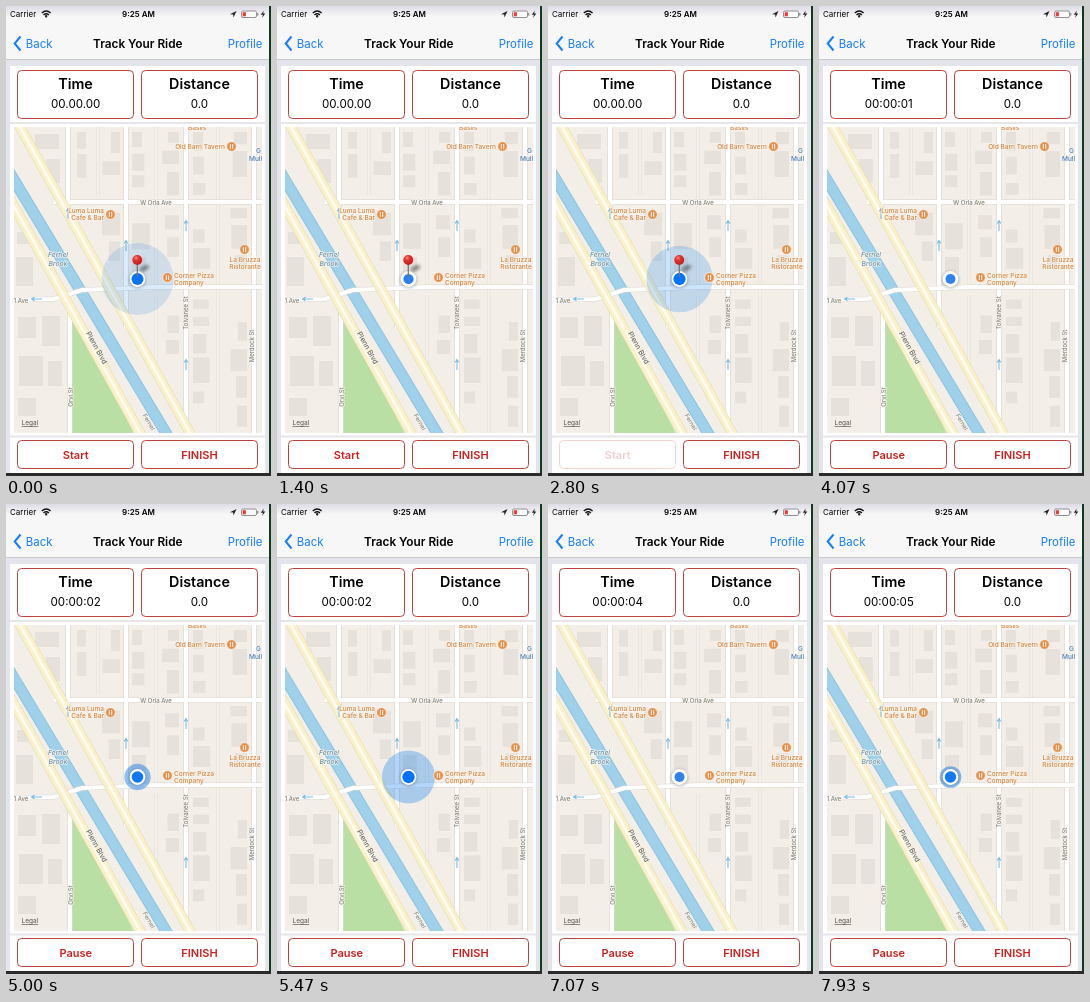
Write an HTML page that moves like this. It is 265 by 470 pixels and loops after 8 s.

```html
<!DOCTYPE html>
<html lang="en">
<head>
<meta charset="utf-8">
<title>Track Your Ride</title>
<style>
  html, body { margin: 0; width: 100%; height: 100%; overflow: hidden; background: #fff; }
  svg { display: block; width: 265px; height: 470px; font-family: Inter, Roboto, sans-serif; }
  .mid { text-anchor: middle; }
  .bold { font-weight: 600; }
  .box { fill: #fff; stroke: #c0423f; }
  .link { fill: #157efb; font-size: 11.4px; }
  .poi { fill: #d7853f; font-size: 6.5px; font-weight: 500; }
  .street { fill: #77736d; font-size: 6px; }
  .water { fill: #55839d; font-size: 6.8px; font-style: italic; }
  .halo-text text { paint-order: stroke; stroke: #f7f4ee; stroke-width: 1.4px; stroke-linejoin: round; }
  .red { fill: #c8211f; font-size: 11px; font-weight: 600; text-anchor: middle; }
</style>
</head>
<body>
<svg viewBox="0 0 265 470">
  <defs>
    <clipPath id="mapClip"><rect x="8" y="121" width="248" height="306"/></clipPath>
    <linearGradient id="barFill" x2="0" y2="1">
      <stop offset="0" stop-color="#dddce6"/><stop offset=".2" stop-color="#f7f7f8"/>
    </linearGradient>
    <radialGradient id="pinFill" cx=".38" cy=".3" r=".75">
      <stop offset="0" stop-color="#ff8a80"/><stop offset=".35" stop-color="#e2322c"/><stop offset="1" stop-color="#bd1d1b"/>
    </radialGradient>
    <filter id="soft" x="-50%" y="-50%" width="200%" height="200%"><feGaussianBlur stdDeviation="1.5"/></filter>
    <path id="arrow" d="M0 5V-5M-1.8-2.5L0-5.5L1.8-2.5" fill="none" stroke="#7dbbe3" stroke-width="1.1"/>
  </defs>

  <!-- Screen and navigation bar -->
  <rect width="265" height="470" fill="#e4e4ec"/>
  <rect width="263" height="53" fill="url(#barFill)"/>
  <path d="M0 53.5H263" stroke="#c9cace"/>
  <rect x="4" y="60" width="255" height="407" fill="#fff"/>
  <path d="M4 117H259M4 430.5H259" stroke="#e6e6e8" stroke-width="2"/>
  <path d="M264 0V470" stroke="#0f3a1e" stroke-width="2"/>
  <path d="M0 468.5H265" stroke="#2b2b2d" stroke-width="3"/>

  <g font-size="8">
    <text x="4" y="11">Carrier</text>
    <text x="132.5" y="11" class="mid bold">9:25 AM</text>
  </g>
  <g fill="none" stroke="#111" stroke-width="1.4">
    <path d="M35.8 7Q40.2 3.2 44.6 7M37.5 9Q40.2 6.7 42.9 9"/>
    <circle cx="40.2" cy="10.3" r=".5"/>
  </g>
  <path d="M224 8.3L230.5 5L227.5 11.5L227.2 8.5Z" fill="#222"/>
  <rect x="235.5" y="5" width="15" height="6.5" rx="1.5" fill="#fff" stroke="#777" stroke-width=".8"/>
  <rect x="236.7" y="6.2" width="3.2" height="4.1" fill="#f03a30"/>
  <path d="M251.8 7V9.6" stroke="#777"/>
  <path d="M257.8 4.5L254.8 8.8H257L256 12L259.3 7.5H257.1Z" fill="#222"/>

  <path d="M14.5 30.5L8.7 37.5L14.5 44.5" fill="none" stroke="#157efb" stroke-width="2"/>
  <text x="19.8" y="42" class="link">Back</text>
  <text x="131.8" y="42" class="mid bold" font-size="11.8">Track Your Ride</text>
  <text x="256.3" y="42" class="link" text-anchor="end">Profile</text>

  <!-- Readouts -->
  <rect x="11.5" y="64.5" width="116" height="48" rx="4" class="box"/>
  <rect x="135.5" y="64.5" width="116" height="48" rx="4" class="box"/>
  <g class="mid">
    <text x="69.5" y="82.5" class="bold" font-size="14.3">Time</text>
    <text x="193.5" y="82.5" class="bold" font-size="14.3">Distance</text>
    <text x="69.7" y="102" font-size="11.6" id="clock">00.00.00</text>
    <text x="193.5" y="102" font-size="11.6">0.0</text>
  </g>

  <!-- Map -->
  <g clip-path="url(#mapClip)">
    <rect x="8" y="121" width="248" height="306" fill="#f3eee8"/>
    <g id="buildings" fill="#e6e1da"/>
    <g id="roads" fill="none"/>
    <circle id="pulse" cx="131.5" cy="273" fill="#0a7aec"/>

    <g class="halo-text">
      <g class="street mid">
        <text x="150" y="198.5">W Orla Ave</text>
        <text x="15" y="297">1 Ave</text>
        <text transform="translate(181.5 307) rotate(-90)">Tolvanee St</text>
        <text transform="translate(247.5 340) rotate(-90)">Merdock St</text>
        <text transform="translate(67 391) rotate(-90)">Orvi St</text>
        <text transform="translate(88.5 343) rotate(61)" style="font-size:7.2px;fill:#55524c">Plenn Blvd</text>
        <text transform="translate(141 417) rotate(60)">Fernel</text>
      </g>
      <g class="water mid">
        <text x="52" y="251">Fernel</text>
        <text x="52" y="259.5">Brook</text>
      </g>
      <g class="poi">
        <text x="182" y="124">Basils</text>
        <text x="219" y="143" text-anchor="end">Old Barn Tavern</text>
        <text x="98" y="207" text-anchor="end">Luma Luma</text>
        <text x="98" y="214" text-anchor="end">Cafe &amp; Bar</text>
        <text x="168" y="271.5">Corner Pizza</text>
        <text x="168" y="278.5">Company</text>
        <text x="239" y="255.5" class="mid">La Bruzza</text>
        <text x="239" y="262.5" class="mid">Ristorante</text>
        <g fill="#4a7fb5"><text x="250" y="147">G</text><text x="243" y="154.5">Mull</text></g>
      </g>
    </g>
    <g id="icons"/>
    <text x="15.5" y="419" font-size="6.5" fill="#55524e" text-decoration="underline">Legal</text>

    <!-- Location dot and pin -->
    <circle cx="131.5" cy="273.5" r="8.6" fill="#555" opacity=".4" filter="url(#soft)"/>
    <circle cx="131.5" cy="273" r="7.9" fill="#fff"/>
    <circle id="dot" cx="131.5" cy="273"/>
    <g id="pin">
      <ellipse cx="138.5" cy="262" rx="5" ry="2.6" transform="rotate(-25 138.5 262)" fill="#333" opacity=".5" filter="url(#soft)"/>
      <path d="M131.3 258V271" stroke="#777" stroke-width="1.3"/>
      <circle cx="131.3" cy="254" r="4.9" fill="url(#pinFill)"/>
    </g>
  </g>

  <!-- Buttons -->
  <g id="startButton">
    <rect x="11.5" y="434.5" width="116" height="28" rx="4" class="box"/>
    <text x="69.7" y="452.5" class="red" id="startLabel">Start</text>
  </g>
  <rect x="135.5" y="434.5" width="116" height="28" rx="4" class="box"/>
  <text x="193.5" y="452.5" class="red">FINISH</text>
</svg>

<script>
const $ = id => document.getElementById(id);
const clamp = x => Math.max(0, Math.min(1, x));

// Building footprints line both sides of each block
let seed = 11;
const random = () => (seed = seed * 16807 % 2147483647) / 2147483647;
const blocks = [[71, 114], [126, 173], [187, 241]];
let footprints = '';
for (const [left, right] of blocks) {
  for (const side of [0, 1]) {
    for (let y = 126; y < 424;) {
      const w = 9 + random() * 9, h = 9 + random() * 17;
      const x = side ? right - w : left;
      const clearOfRoad = x > 14 + (y + h - 121) / 1.8 + 12;
      const clearOfStreets = [196, 283].every(s => y > s + 6 || y + h < s - 6);
      if (clearOfRoad && clearOfStreets) {
        footprints += `<rect x="${x}" y="${y}" width="${w}" height="${h}"/>`;
      }
      y += h + 4 + random() * 5;
    }
  }
}
for (const [x, y, w, h] of [[29, 128, 24, 15], [40, 153, 14, 24], [11, 226, 15, 12],
  [10, 251, 17, 29], [12, 311, 18, 21], [36, 310, 18, 30], [13, 350, 24, 30], [42, 355, 14, 25], [12, 392, 18, 18]]) {
  footprints += `<rect x="${x}" y="${y}" width="${w}" height="${h}"/>`;
}
$('buildings').innerHTML = footprints;

const stroke = (d, color, width) => `<path d="${d}" stroke="${color}" stroke-width="${width}"/>`;
const road = (d, width, fill = '#fff', edge = '#ddd8d0') => stroke(d, edge, width + 1.2) + stroke(d, fill, width);
// Parallel avenues, shifted horizontally
const avenue = shift => `M${4 + shift} 103L${194 + shift} 445`;
const river = 'M-4 154L172 447';
const streets = 'M62 115V206M120 115V322M180 115V430M248 115V430M64 298V430M48 196H260';
const crossing = 'M0 294L48 293L76 284L150 281L260 281';
$('roads').innerHTML =
  '<path d="M66 300V430H129Z" fill="#b9dfa5"/>' +
  road('M92 121V190M150 121V278M212 121V427M150 290V360', 1.5, '#faf8f4') +
  road(streets, 4) +
  stroke(river, '#8dc3df', 11.5) +
  stroke(river, '#9fd1ea', 9.5) +
  road(crossing, 4) +
  [-50, 0].map(s => road(avenue(s), 9, '#faf1cb', '#e6dcae') + stroke(avenue(s), '#fffdf2', 2.5)).join('') +
  [[120, 240, 0], [180, 220, 0], [180, 359, 0], [62, 208, 0], [31, 293, -90]]
    .map(([x, y, a]) => `<use href="#arrow" transform="translate(${x} ${y}) rotate(${a})"/>`).join('');

$('icons').innerHTML = [[225.5, 140.5], [104.5, 208.5], [161.5, 271.5], [238.5, 243.5]].map(([x, y]) =>
  `<circle cx="${x}" cy="${y}" r="4.8" fill="#e58e47" stroke="#fff" stroke-width=".6"/>
   <path d="M${x - 1.2} ${y - 2.5}v5M${x + 1.2} ${y - 2.5}v5" stroke="#fff" stroke-width=".9"/>`).join('');

const LOOP = 8000, PERIOD = 3000, SPREAD = 1600;
const PRESS = 2550, START = 2870;

function draw(now) {
  const t = now % LOOP;

  const phase = (t + 1150) % PERIOD;
  const rest = 1 - clamp(phase / SPREAD);
  $('pulse').setAttribute('r', 8 + 31 * (1 - rest ** 1.85));
  $('pulse').setAttribute('opacity', .5 * rest ** .95);

  const swell = Math.cos((phase - 750) / PERIOD * 2 * Math.PI);
  $('dot').setAttribute('r', 5.6 + .6 * swell);
  $('dot').setAttribute('fill', `rgb(${24 - 24 * swell},${122 - 8 * swell},${243 + 8 * swell})`);

  const started = t >= START;
  const seconds = Math.floor((t - START) / 1000);
  $('clock').textContent = seconds > 0 ? `00:00:0${seconds}` : '00.00.00';
  $('startLabel').textContent = started ? 'Pause' : 'Start';
  $('pin').setAttribute('visibility', started ? 'hidden' : 'visible');
  const dim = started ? 1 - clamp((t - START) / 200) : clamp((t - PRESS) / 100);
  $('startButton').setAttribute('opacity', 1 - .78 * dim);

  requestAnimationFrame(() => draw(performance.now()));
}
draw(0);
</script>
</body>
</html>
```
